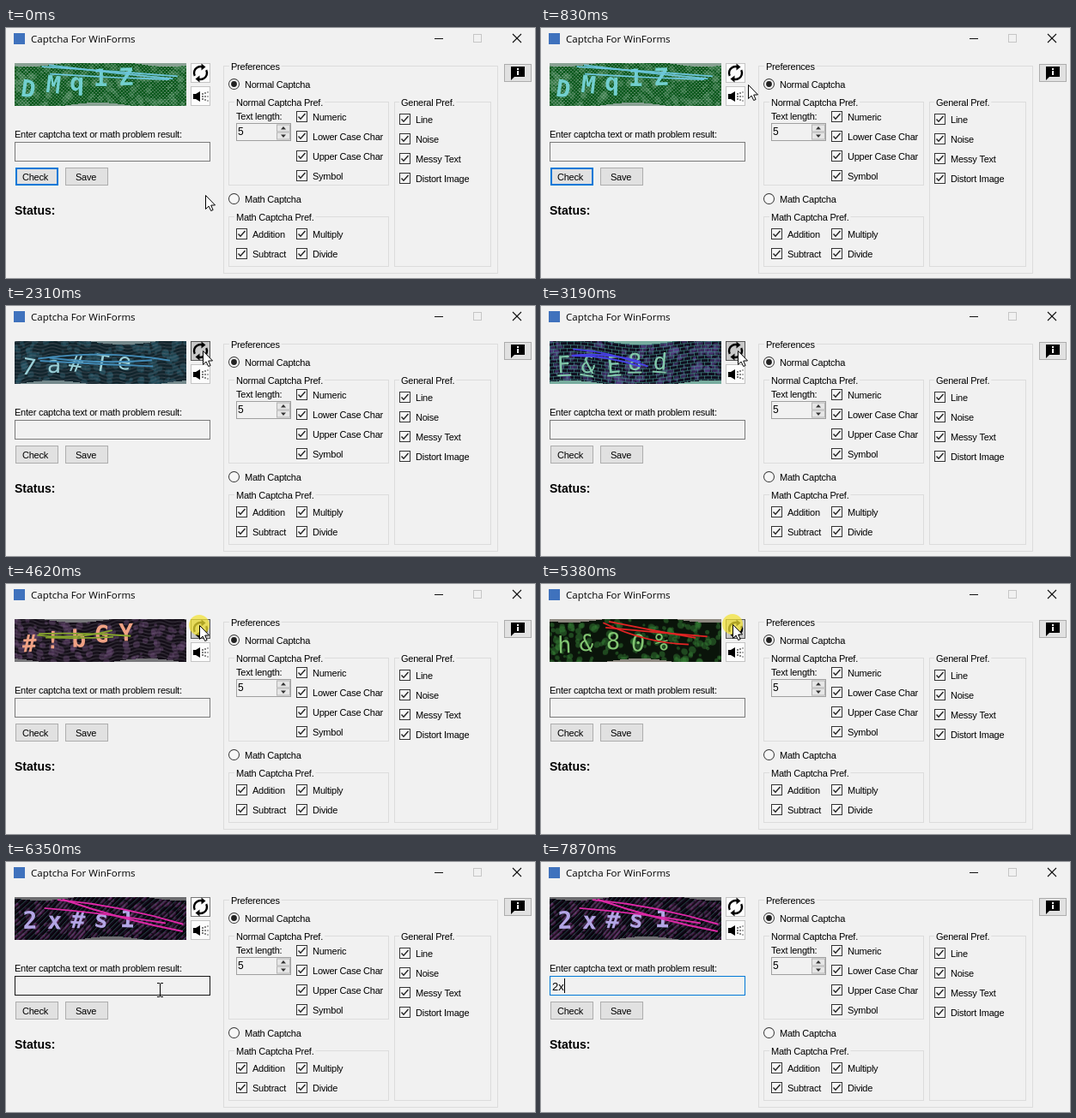
Recreate the animation shown at these times as an HTML page with a canvas. Size 616 by 292 pixels, loop 8 s.

```html
<!DOCTYPE html>
<html lang="en">
<head>
<meta charset="utf-8">
<title>Captcha For WinForms</title>
<style>
html, body { margin: 0; width: 100%; height: 100%; overflow: hidden; background: #f1f1f1; }
canvas { display: block; }
</style>
</head>
<body>
<canvas id="stage" width="616" height="292"></canvas>
<script>
const LOOP = 8000;
const FACE = '#f1f1f1';
const UI = '"Liberation Sans", Arial, sans-serif';
const ctx = document.getElementById('stage').getContext('2d');

// The button goes down at "down" and the new captcha appears on release, at "at".
// "rise" is the climb per letter; strokes run from around "from" to around "to".
const captchas = [
  { down: 0, at: 0, text: 'DMq1Z', bold: true, rise: 3.2, phase: 1, pattern: 'dots',
    bg: '#0c5a1e', blob: '#4c8a5c', edge: '#8aa294', ink: '#72cfcf', line: '#6cc6dc', from: [42, 8], to: [190, 18] },
  { down: 1000, at: 1060, text: 'tpO&R', rise: 1, phase: .2, pattern: 'diamonds',
    bg: '#0e0e22', blob: '#3c4068', edge: '#75868a', ink: '#c3c6ea', line: '#6d942c', from: [30, 30], to: [150, 22] },
  { down: 1520, at: 1720, text: 'K4w%n', rise: 1, phase: 2, pattern: 'diag',
    bg: '#2a1a14', blob: '#6a4530', edge: '#8c8478', ink: '#e0b878', line: '#c06a38', from: [30, 25], to: [175, 25] },
  { down: 2180, at: 2310, text: '7a#Te', rise: 1, phase: 3, pattern: 'waves',
    bg: '#10242c', blob: '#285868', edge: '#75898c', ink: '#9bd0d8', line: '#438cb8', from: [35, 25], to: [170, 25] },
  { down: 3010, at: 3190, text: 'F&E8d', under: true, rise: .8, phase: 3.8, pattern: 'bricks',
    bg: '#100e20', blob: '#5c4890', edge: '#77ac9e', ink: '#82c8aa', line: '#4640e8', from: [18, 14], to: [116, 24] },
  { down: 3850, at: 4000, text: '#!bGY', bold: true, rise: 3.6, phase: 5.1, pattern: 'waves',
    bg: '#140e18', blob: '#5e4068', edge: '#77777a', ink: '#efa184', line: '#86a52c', from: [26, 22], to: [125, 18] },
  { down: 4620, at: 4770, text: 'h&80%', rise: .8, phase: .7, pattern: '',
    bg: '#0a140a', blob: '#347c34', edge: '#8d8880', ink: '#82c572', line: '#e42424', from: [74, 8], to: [172, 24] },
  { down: 5330, at: 5510, text: '2x#s1', bold: true, rise: .8, phase: .4, pattern: 'diag',
    bg: '#180c20', blob: '#7a3478', edge: '#6d6d70', ink: '#b3a5e5', line: '#dd28a6', from: [44, 8], to: [186, 34] }
];
const fieldPress = { down: 6480, at: 6660 };
const presses = [...captchas, fieldPress];

// Pointer stops: start of move, arrival, x, y.
const home = [232, 195];
const stops = [
  [240, 970, 233, 53], [1260, 1290, 229, 52], [4180, 4310, 221, 55],
  [4540, 4620, 225, 48], [5050, 5330, 223, 47], [5660, 6340, 180, 149]
];

function seeded(seed) {
  return () => (seed = (seed * 16807) % 2147483647) / 2147483647;
}

function rect(c, x, y, w, h, fill, stroke) {
  if (fill) { c.fillStyle = fill; c.fillRect(x, y, w, h); }
  if (stroke) { c.strokeStyle = stroke; c.lineWidth = 1; c.strokeRect(x + .5, y + .5, w - 1, h - 1); }
}

function poly(c, points, fill, stroke, width = 1) {
  c.beginPath();
  points.forEach(([x, y]) => c.lineTo(x, y));
  if (fill) { c.closePath(); c.fillStyle = fill; c.fill(); }
  if (stroke) { c.strokeStyle = stroke; c.lineWidth = width; c.stroke(); }
}

function disc(c, x, y, r, fill) {
  c.beginPath();
  c.arc(x, y, r, 0, 7);
  c.fillStyle = fill;
  c.fill();
}

function label(c, text, x, y, font = '11px ' + UI, spacing = '-0.24px') {
  c.font = font;
  c.letterSpacing = spacing;
  c.fillStyle = '#000';
  c.fillText(text, x, y);
}

function newLayer(w, h) {
  const layer = document.createElement('canvas');
  layer.width = w;
  layer.height = h;
  return layer;
}

const patterns = {
  dots(c) {
    for (let y = 0; y < 50; y += 2)
      for (let x = y % 4; x < 200; x += 4) rect(c, x, y, 2, 1, 'rgba(175,190,180,.55)');
  },
  diamonds(c) {
    for (let x = -50; x < 250; x += 7)
      for (const slant of [0, 50]) poly(c, [[x, slant], [x + 50, 50 - slant]], null, 'rgba(0,0,8,.55)');
  },
  bricks(c) {
    for (let y = 0; y < 50; y += 4) {
      rect(c, 0, y, 200, 1, 'rgba(70,150,140,.6)');
      for (let x = y % 8; x < 200; x += 8) rect(c, x, y, 1, 4, 'rgba(70,150,140,.6)');
    }
  },
  waves(c) {
    for (let y = 0; y < 54; y += 4)
      poly(c, Array.from({ length: 101 }, (_, i) => [i * 2, y + Math.sin(i / 2) * 1.2]), null, 'rgba(130,125,135,.4)');
  },
  diag(c) {
    for (let x = 0; x < 260; x += 6) {
      poly(c, [[x, 0], [x - 50, 50]], null, 'rgba(0,0,0,.65)', 2);
      poly(c, [[x + 2, 0], [x - 48, 50]], null, 'rgba(45,125,100,.5)');
    }
  }
};

function makeCaptcha(spec, index) {
  const flat = newLayer(200, 50), out = newLayer(200, 50);
  const f = flat.getContext('2d'), c = out.getContext('2d');
  const random = seeded(41 + index * 977);
  const jitter = size => (random() * 2 - 1) * size;

  rect(f, 0, 0, 200, 50, spec.bg);
  f.globalAlpha = .5;
  for (let i = 0; i < 170; i++) disc(f, random() * 200, random() * 50, 1.5 + random() * 3, spec.blob);
  f.globalAlpha = 1;
  patterns[spec.pattern]?.(f);

  // Bend the noise into a wave, one column at a time.
  rect(c, 0, 0, 200, 50, spec.edge);
  for (let x = 0; x < 200; x++) c.drawImage(flat, x, 0, 1, 50, x, 4 * Math.sin(x / 26 + spec.phase), 1, 50);

  c.font = spec.bold ? 'bold 28px "DejaVu Sans Mono", monospace' : '27px "DejaVu Sans Mono", monospace';
  [...spec.text].forEach((char, i) => {
    c.save();
    c.translate(17 + i * 28 + jitter(2), 29 - spec.rise * i + jitter(2));
    c.rotate(.06 + jitter(.12));
    c.fillStyle = spec.ink;
    c.fillText(char, -8, 9);
    if (spec.under) c.fillRect(-8, 11, 16, 2);
    c.restore();
  });

  c.strokeStyle = spec.line;
  c.lineWidth = 1.9;
  const near = ([x, y]) => [x + jitter(12), y + jitter(6)];
  for (let i = 0; i < 3; i++) {
    const [x0, y0] = near(spec.from), [x1, y1] = near(spec.to);
    c.beginPath();
    c.moveTo(x0, y0);
    c.quadraticCurveTo((x0 + x1) / 2, (y0 + y1) / 2 + jitter(12), x1, y1);
    c.stroke();
  }
  return out;
}

function group(c, title, x, y, w, h, titleX) {
  rect(c, x, y, w, h, null, '#dcdcdc');
  c.font = '11px ' + UI;
  c.letterSpacing = '-0.24px';
  rect(c, titleX - 2, y - 2, c.measureText(title).width + 4, 6, FACE);
  label(c, title, titleX, y + 5);
}

function checks(c, x, y, ...names) {
  names.forEach((name, i) => {
    const top = y + i * 23 - 7;
    rect(c, x, top, 13, 13, '#f6f6f6', '#333');
    poly(c, [[x + 2.5, top + 6.5], [x + 5, top + 9.2], [x + 10.5, top + 3]], null, '#222', 1.4);
    label(c, name, x + 19, top + 11);
  });
}

function radio(c, text, y, on) {
  disc(c, 265.5, y, 6.5, '#333');
  disc(c, 265.5, y, 5.5, '#f6f6f6');
  if (on) disc(c, 265.5, y, 3.4, '#222');
  label(c, text, 278, y + 4.5);
}

function drawCaption(c) {
  rect(c, 9, 6, 13, 13, '#3f72bd');
  label(c, 'Captcha For WinForms', 29, 17, '11.5px "Open Sans", sans-serif', '0px');
  rect(c, 499, 12, 10, 1, '#111');
  rect(c, 544, 7, 10, 10, null, '#c6c6c6');
  for (const x of [590, 600]) poly(c, [[x, 7], [1190 - x, 17]], null, '#111', 1.1);
}

function drawLengthBox(c) {
  label(c, 'Text length:', 268, 107);
  rect(c, 268, 111, 64, 21, FACE, '#a0a0a0');
  label(c, '5', 270, 125, '12px ' + UI);
  for (const dir of [-1, 1]) {
    const mid = 121.5 + dir * 4.5;
    rect(c, 315, mid - 4.5, 16, 9, '#e6e6e6', '#b4b4b4');
    poly(c, [[320, mid - dir * 1.5], [326, mid - dir * 1.5], [323, mid + dir * 2]], '#333');
  }
}

function drawInfoButton(c) {
  rect(c, 580, 42, 32, 21, '#e1e1e1', '#adadad');
  rect(c, 588, 45, 16, 12, '#000');
  poly(c, [[588, 56], [588, 61], [593, 56]], '#000');
  rect(c, 595, 47, 2, 2, '#fff');
  rect(c, 595, 50, 2, 5, '#fff');
}

function drawSpeaker(c) {
  rect(c, 215, 68, 23, 23, '#fcfcfc', '#c4c4c4');
  rect(c, 218, 77, 4, 6, '#000');
  poly(c, [[221, 77], [226, 74], [226, 86], [221, 83]], '#000');
  for (let column = 0; column < 3; column++)
    for (const row of [-1, 0, 1]) disc(c, 229 + column * 3, 80 + row * (3 + column), 1 - column * .1, '#555');
}

function makeWindow() {
  const layer = newLayer(616, 292), c = layer.getContext('2d');
  rect(c, 0, 0, 616, 292, FACE);
  drawCaption(c);
  label(c, 'Enter captcha text or math problem result:', 10, 128);
  label(c, 'Status:', 10, 218, 'bold 14px ' + UI, '0px');

  group(c, 'Preferences', 253, 44, 320, 243, 262);
  group(c, 'Normal Captcha Pref.', 259, 86, 187, 98, 268);
  group(c, 'General Pref.', 452, 86, 113, 193, 460);
  group(c, 'Math Captcha Pref.', 259, 220, 187, 59, 268);
  radio(c, 'Normal Captcha', 65.5, true);
  radio(c, 'Math Captcha', 199.5, false);
  checks(c, 338, 104, 'Numeric', 'Lower Case Char', 'Upper Case Char', 'Symbol');
  checks(c, 458, 107, 'Line', 'Noise', 'Messy Text', 'Distort Image');
  checks(c, 268, 241, 'Addition', 'Subtract');
  checks(c, 338, 241, 'Multiply', 'Divide');

  drawLengthBox(c);
  drawInfoButton(c);
  drawSpeaker(c);
  return layer;
}

function drawButton(text, x, textX, focused) {
  rect(ctx, x, 163, 50, 21, '#e1e1e1', focused ? '#0078d7' : '#adadad');
  if (focused) rect(ctx, x + 1, 164, 48, 19, null, '#0078d7');
  label(ctx, text, textX, 178);
}

function drawRefresh(hover, focused) {
  rect(ctx, 215, 41, 23, 23, hover ? '#c8c8c8' : '#fcfcfc', hover ? '#555' : focused ? '#777' : '#c4c4c4');
  for (const turn of [0, Math.PI]) {
    ctx.save();
    ctx.translate(226.5, 52.5);
    ctx.rotate(turn);
    ctx.beginPath();
    ctx.arc(0, 0, 7.5, Math.PI * .85, Math.PI * 1.6);
    ctx.strokeStyle = '#000';
    ctx.lineWidth = 2.4;
    ctx.stroke();
    poly(ctx, [[1, -11], [1, -3], [6, -7]], '#000');
    ctx.restore();
  }
}

function pointerAt(t) {
  let [x, y] = home;
  for (const [start, end, toX, toY] of stops) {
    if (t < start) break;
    const p = Math.min(1, (t - start) / (end - start));
    const k = p * p * (3 - 2 * p);
    // Upward moves swing out to the right.
    const bow = Math.max(0, y - toY) * .2 * Math.sin(Math.PI * k);
    x += (toX - x) * k + bow;
    y += (toY - y) * k;
  }
  return [Math.round(x), Math.round(y)];
}

function drawArrow(x, y) {
  ctx.save();
  ctx.translate(x + .5, y + .5);
  poly(ctx, [[0, 0], [0, 16], [3.6, 12.6], [6.2, 18], [8.6, 17], [6.2, 11.6], [11, 11.4], [0, 0]], '#fff', '#000');
  ctx.restore();
}

function drawBeam(x, y) {
  rect(ctx, x - 1, y - 7, 1, 15, '#000');
  for (const end of [y - 8, y + 8])
    for (const side of [x - 4, x]) rect(ctx, side, end, 3, 1, '#000');
}

const base = makeWindow();
const pictures = captchas.map(makeCaptcha);

function draw(t) {
  const [x, y] = pointerAt(t);
  const within = (left, top, w, h) => x >= left && x < left + w && y >= top && y < top + h;
  const overField = within(10, 133, 228, 23);
  const refreshUsed = t >= captchas[1].down;
  const fieldFocus = t >= fieldPress.down + 60;

  ctx.drawImage(base, 0, 0);
  ctx.drawImage(pictures[captchas.findLastIndex(s => t >= s.at)], 10, 41);
  drawRefresh(within(215, 41, 23, 23), refreshUsed && !fieldFocus);
  drawButton('Check', 11, 19, !refreshUsed);
  drawButton('Save', 69, 81, false);

  rect(ctx, 10, 133, 228, 23, FACE, fieldFocus ? '#0078d7' : overField ? '#171717' : '#7a7a7a');
  const typed = t >= 7870 ? '2x' : t >= 7370 ? '2' : '';
  label(ctx, typed, 13, 150, '13px ' + UI, '0px');
  const caretOn = fieldFocus && (t < 7170 || typed);
  if (caretOn) rect(ctx, 13 + typed.length * 7, 136, 1, 17, '#000');

  if (presses.some(p => t >= p.down && t < p.at)) disc(ctx, x, y, 12, 'rgba(243,226,50,.72)');
  if (!typed) (overField ? drawBeam : drawArrow)(x, y);
}

const began = performance.now();
function tick() {
  draw((performance.now() - began) % LOOP);
  requestAnimationFrame(tick);
}
tick();
</script>
</body>
</html>
```
